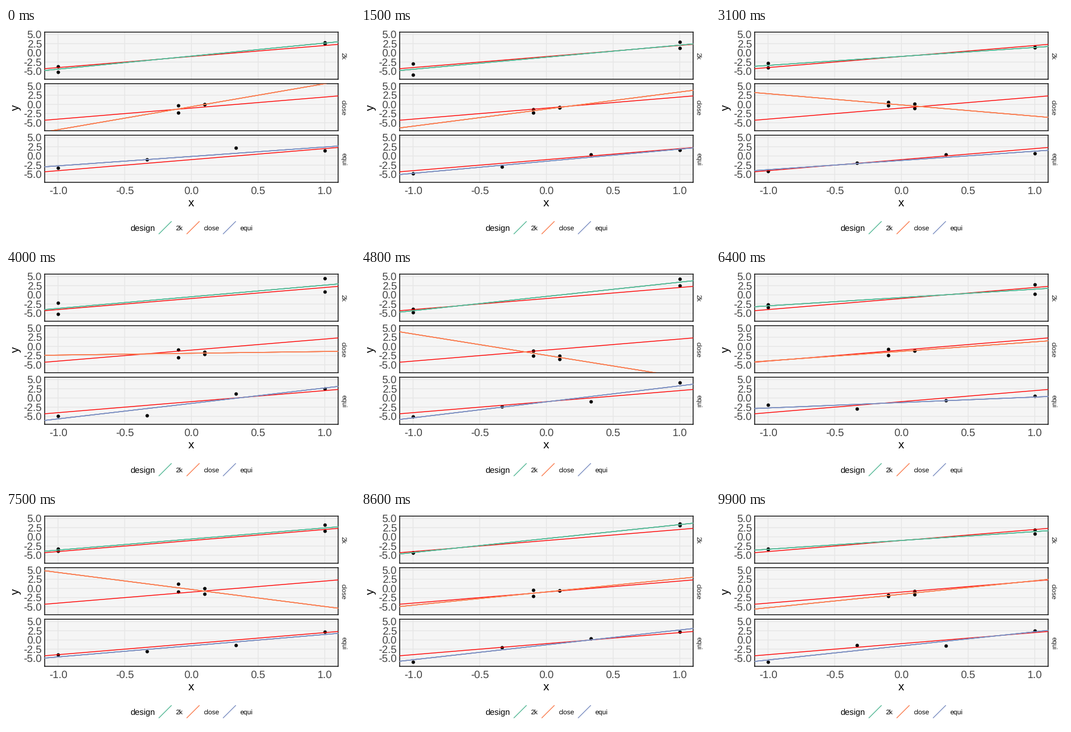
Write a matplotlib script that moves like this. It is 624 by 384 pixels and loops after 10 s.

```python
import numpy as np
import matplotlib.pyplot as plt
from matplotlib.animation import FuncAnimation

plt.rcParams.update({
    "font.family": "Liberation Sans",
    "text.hinting": "none",
    "text.hinting_factor": 1,
})

W, H, DPI = 624, 384, 96
FRAMES, INTERVAL = 100, 100
PT = 72 / DPI
LINE = 1.42 * PT

# Panel geometry in pixels
LEFT, RIGHT = 69.2, 593.8
TOP, PANEL_H, STEP = 7.4, 84.5, 92.5
UNIT, TOP_GAP = 6.6, 37.2

X_TICKS = np.arange(-1, 1.1, 0.5)
Y_TICKS = np.arange(-5, 5.1, 2.5)
EDGE = np.array([-1.1, 1.1])
TICK_INK = "#454545"

DESIGNS = {
    "2k": ("#57b997", np.array([-1, -1, 1, 1])),
    "close": ("#fa7e52", np.array([-0.1, -0.1, 0.1, 0.1])),
    "equi": ("#7d90c2", np.linspace(-1, 1, 4)),
}


def truth(x):
    return 3 * x - 1


def simulate(i):
    """One noisy experiment per design, fully determined by i."""
    rng = np.random.default_rng(100 + i)
    for _, x in DESIGNS.values():
        yield x, np.clip(truth(x) + rng.normal(size=4), -6.6, 5.05)


fig = plt.figure(figsize=(W / DPI, H / DPI), dpi=DPI, facecolor="white")

# Overlay in pixel coordinates, y pointing down
page = fig.add_axes([0, 0, 1, 1], zorder=5)
page.set(xlim=(0, W), ylim=(H, 0))
page.axis("off")


def label(x, y, text, size, color="black", ha="left", rot=0):
    page.text(x, y, text, fontsize=size, color=color, ha=ha, va="baseline",
              rotation=rot, rotation_mode="anchor")


def add_panel(top):
    ax = fig.add_axes([LEFT / W, 1 - (top + PANEL_H) / H,
                       (RIGHT - LEFT) / W, PANEL_H / H])
    ax.set(xlim=EDGE, ylim=((TOP_GAP - PANEL_H) / UNIT, TOP_GAP / UNIT),
           xticks=[], yticks=[], facecolor="#f5f5f5")
    for side in ax.spines.values():
        side.set(color="black", linewidth=LINE, snap=False)
    grid = dict(color="#e6e6e6", linewidth=LINE, zorder=1, snap=False)
    for v in X_TICKS:
        ax.axvline(v, **grid)
    for v in Y_TICKS:
        ax.axhline(v, **grid)
        label(64, top + TOP_GAP - v * UNIT + 6.6, f"{v:.1f}", 14, TICK_INK,
              "right")
    return ax


dots, fits = [], []
for row, (name, (color, x)) in enumerate(DESIGNS.items()):
    top = TOP + row * STEP
    ax = add_panel(top)
    dots += ax.plot(x, truth(x), "o", color="black", ms=6.2 * PT, mew=0,
                    zorder=2)
    ax.plot(EDGE, truth(EDGE), color="red", lw=LINE, zorder=3)
    # one fitted line per run, stacked
    fits.append(ax.plot(EDGE, np.zeros((2, 4)), color=color, lw=LINE,
                        zorder=4))
    label(599.7, top + PANEL_H / 2 + 0.8, name, 8.8, "#1a1a1a", "center", -90)

for v in X_TICKS:
    label(np.interp(v, EDGE, [LEFT, RIGHT]), 298.2, f"{v:.1f}", 14, TICK_INK,
          "center")
label(331.5, 320, "x", 16, ha="center")
label(22.3, 142.3, "y", 16, ha="center", rot=90)

# Legend
label(222.5, 364, "design", 11)
for (name, (color, _)), x in zip(DESIGNS.items(), (273.1, 323, 388)):
    page.plot([x, x + 23], [369.8, 346.8], color=color, lw=LINE,
              solid_capstyle="butt")
    label(x + 30.2, 363.2, name, 8.8)


def update(i):
    for (x, y), dot, lines in zip(simulate(i), dots, fits):
        dot.set_ydata(y)
        ends = np.polyval(np.polyfit(x, y, 1), EDGE)
        for line in lines:
            line.set_ydata(ends)
    return dots


anim = FuncAnimation(fig, update, frames=FRAMES, interval=INTERVAL,
                     repeat=True, repeat_delay=0, blit=False)
plt.show()
```
